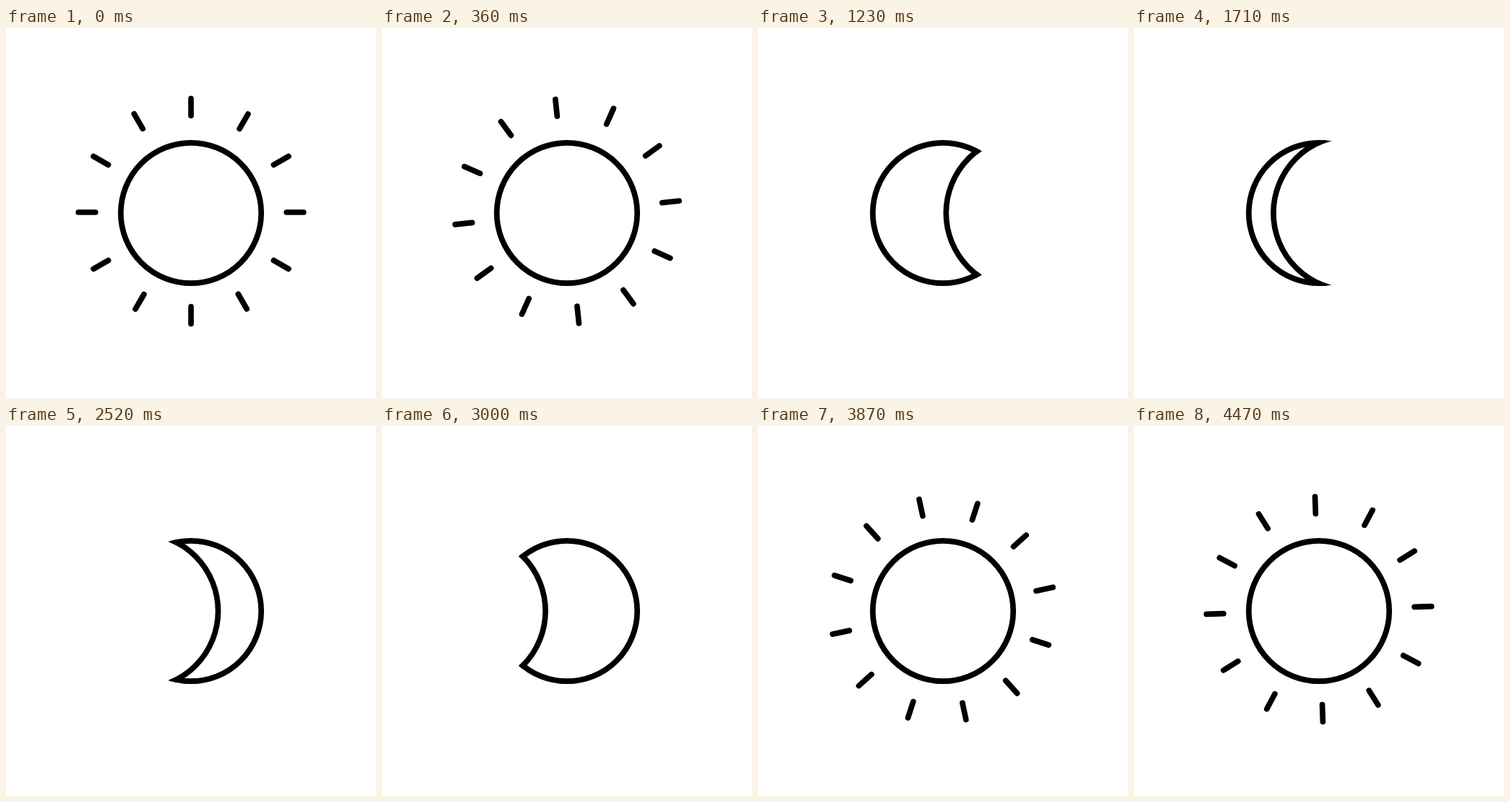
An HTML page with a canvas that plays this animation: 512 by 512 pixels, repeating every 4.5 s.

```html
<!DOCTYPE html>
<html lang="en">
<head>
<meta charset="utf-8">
<title>Sun and moon phases</title>
<style>
  html, body { margin: 0; width: 100%; height: 100%; overflow: hidden; background: #fff; }
  canvas { display: block; width: 100vmin; height: 100vmin; }
</style>
</head>
<body>
<canvas id="stage" width="512" height="512"></canvas>
<script>
const ctx = document.getElementById('stage').getContext('2d');
const LOOP = 4500, STEP = 30;
const CENTER = 256, TAU = Math.PI * 2;
const STROKE = 7.7, SUN_R = 97.2, SHADOW_R = 103.3;
const RAY_INNER = 132.2, RAY_OUTER = 155.8;

// Opposite rays share a slight offset from the pivot.
const PAIR_OFFSETS = [[0, -2.5], [1, -2], [0, -0.5], [0, -1], [0, -0.5], [-0.75, -2.2]];

const progress = (t, from, to) => Math.min(1, Math.max(0, (t - from) / (to - from)));

function circle(x, radius) {
  ctx.beginPath();
  ctx.arc(x, CENTER, radius, 0, TAU);
}

function drawRays(t) {
  const growth = t < LOOP / 2 ? 1 - progress(t, 370, 665) : progress(t, 3090, 3390);
  if (growth === 0) return;

  const tip = RAY_INNER + (RAY_OUTER - RAY_INNER) * growth;
  const degrees = (t < LOOP / 2 ? t : t - LOOP) / 15;
  ctx.save();
  ctx.translate(CENTER, CENTER);
  ctx.rotate(degrees * TAU / 360);
  ctx.beginPath();
  for (let i = 0; i < 12; i++) {
    const [dx, dy] = PAIR_OFFSETS[i % 6];
    const sin = Math.sin(i * TAU / 12), cos = Math.cos(i * TAU / 12);
    ctx.moveTo(dx + RAY_INNER * sin, dy - RAY_INNER * cos);
    ctx.lineTo(dx + tip * sin, dy - tip * cos);
  }
  ctx.stroke();
  ctx.restore();
}

function drawDisc(t) {
  circle(CENTER, SUN_R);
  ctx.stroke();

  // The outlined shadow shows only inside the disc.
  const shadowX = 434.8 - 0.14035 * (t - 750);
  ctx.save();
  circle(CENTER, SUN_R + STROKE / 2 + 1);
  ctx.clip();
  circle(shadowX, SHADOW_R);
  ctx.fill();
  ctx.restore();

  ctx.save();
  circle(CENTER, SUN_R + STROKE / 2);
  ctx.clip();
  circle(shadowX, SHADOW_R + STROKE / 2);
  ctx.stroke();
  ctx.restore();
}

function draw(t) {
  ctx.fillStyle = '#fff';
  ctx.fillRect(0, 0, 512, 512);
  ctx.strokeStyle = '#000';
  ctx.lineWidth = STROKE;
  ctx.lineCap = 'round';
  drawRays(t);
  drawDisc(t);
}

const start = performance.now();
function tick() {
  const elapsed = performance.now() - start;
  draw(Math.floor((elapsed + 2) / STEP) * STEP % LOOP);
  requestAnimationFrame(tick);
}
tick();
</script>
</body>
</html>
```
